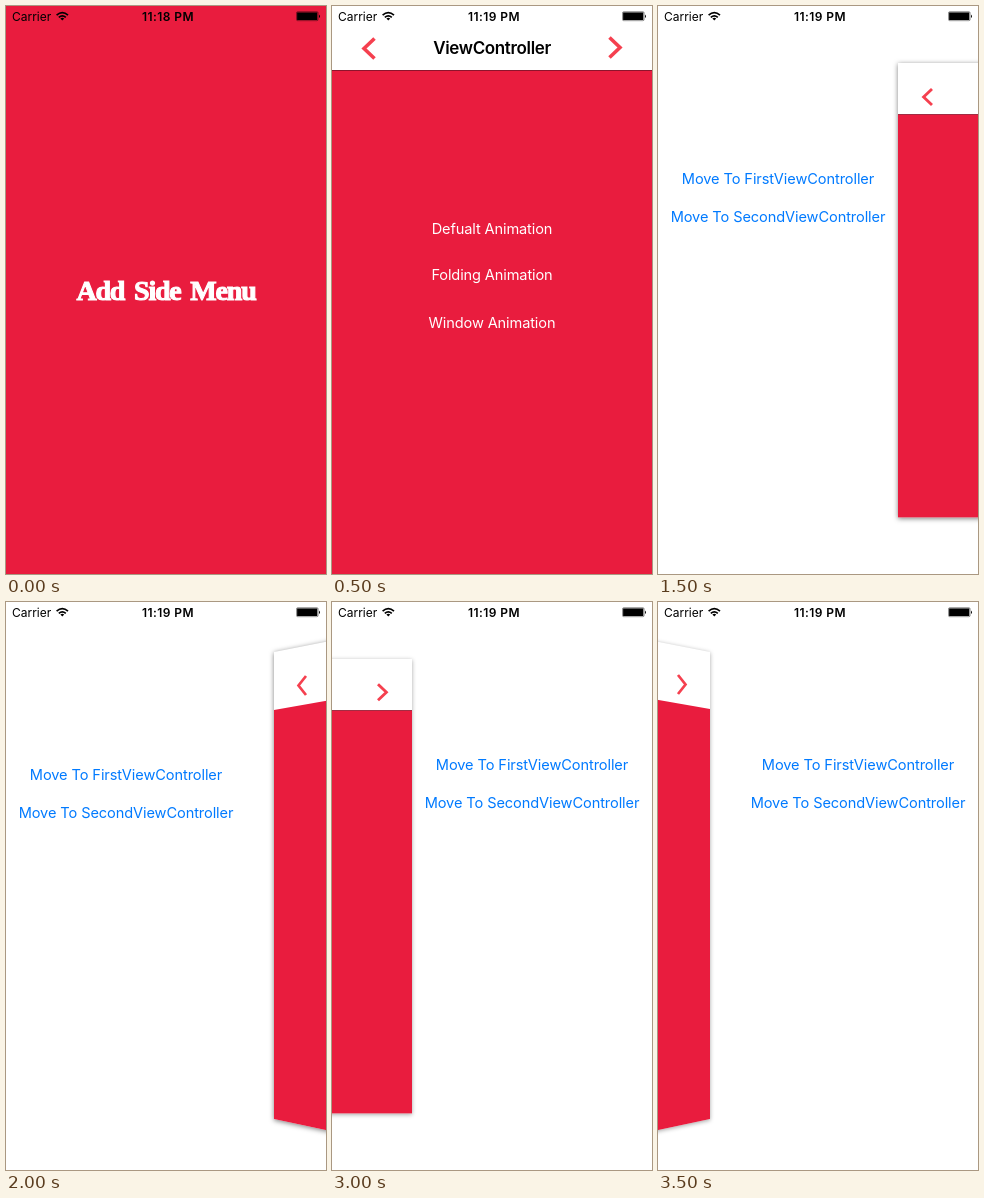
These frames come from a looping animation (320 px wide and 568 px high, 4000 ms). An HTML page:

```html
<!DOCTYPE html>
<html lang="en">
<head>
<meta charset="utf-8">
<style>
  html, body { margin: 0; width: 100%; height: 100%; overflow: hidden; background: #fff; }
  svg { display: block; width: 320px; height: 568px; font-family: Inter, Roboto, sans-serif; }
  .slab { font: bold 28px "Liberation Serif", serif; letter-spacing: -1.2px; word-spacing: 4px; fill: #fff; stroke: #fff; stroke-width: 1.1; }
  .title { font-size: 17px; font-weight: 600; letter-spacing: -.35px; }
  .item { font-size: 14.6px; letter-spacing: -.13px; fill: #fff; }
  .link { font-size: 14.6px; letter-spacing: -.1px; fill: #007aff; }
  .clock { font-size: 12px; font-weight: 600; letter-spacing: .4px; }
  .carrier { font-size: 12px; }
  .arrow { fill: none; stroke: #f5404f; stroke-width: 3.6; }
  .tilted .arrow { stroke-width: 2.7; }
  .left { filter: drop-shadow(0 1.5px 2.6px rgba(0, 0, 0, .5)); }
  .right { filter: drop-shadow(0 1.5px 2.3px rgba(0, 0, 0, .35)); }
</style>
</head>
<body>
<svg id="stage" viewBox="0 0 320 568"></svg>
<script>
const RED = '#e91c3e';
const stage = document.getElementById('stage');

const label = (kind, x, y, text, anchor = 'middle') =>
  `<text class="${kind}" x="${x}" y="${y}" text-anchor="${anchor}">${text}</text>`;
const rect = (x, y, w, h, fill) =>
  `<rect x="${x}" y="${y}" width="${w}" height="${h}" fill="${fill}"/>`;
const arrow = (x, y, w = 10.5, h = 10) =>
  `<path class="arrow" d="M${x + w} ${y - h}L${x} ${y}l${w} ${h}"/>`;
const mirror = content => `<g transform="matrix(-1 0 0 1 320 0)">${content}</g>`;

const statusBar = time =>
  label('carrier', 6, 14.5, 'Carrier', 'start') +
  label('clock', 162, 14.5, time) +
  `<g fill="none" stroke="#000" stroke-width="1.7">
    <path d="M50.6 9.2q5.7-5 11.4 0M52.8 11.4q3.5-3 7 0"/>
    <path d="M54.4 12.4q1.9-1.5 3.8 0l-1.9 2z" fill="#000" stroke="none"/>
  </g>
  <rect x="290.5" y="5.7" width="21.6" height="9" rx="1.2" stroke="#000" stroke-opacity=".6" stroke-width=".7" fill="none"/>
  ${rect(291.1, 6.4, 20.2, 7.6, '#000')}
  <path d="M313 8.4q2 1.8 0 3.6z"/>`;

const page = () => rect(0, 0, 320, 568, '#fff') + rect(0, 64, 320, 504, RED) + rect(0, 64, 320, .6, '#501020');

// Panel styles, drawn at the right edge; the left side is their mirror.
const panels = {
  slide: dy => `<g transform="translate(240 0)">${page()}${arrow(32, 42.5 + dy)}</g>`,
  shrink: dy => `<g transform="translate(240 57) scale(.8)">${page()}${arrow(32, 42.5 + dy)}</g>`,
  tilt: dy => `<g class="tilted"><path d="M268 50L400 24V545L268 517z" fill="#fff"/>
    <path d="M268 ${108 + dy}L400 ${85 + dy}V545L268 517z" fill="${RED}"/>${arrow(292.5, 83.5 + dy, 7.5, 9.5)}</g>`
};

const home = () => rect(0, 0, 320, 568, RED) + label('slab', 160, 294, 'Add Side Menu') + statusBar('11:18 PM');

const list = () => page() + arrow(32, 42.5) + mirror(arrow(32, 41.5)) +
  label('title', 160, 48, 'ViewController') +
  label('item', 160, 227.5, 'Defualt Animation') +
  label('item', 160, 273.5, 'Folding Animation') +
  label('item', 160, 321.5, 'Window Animation') +
  statusBar('11:19 PM');

const menu = (side, style, time) => {
  const isLeft = side === 'left';
  const panel = `<g class="${side}">${panels[style](isLeft ? 0 : -1)}</g>`;
  const x = isLeft ? 120 : 200, y = isLeft ? 178 : 168;
  return rect(0, 0, 320, 568, '#fff') +
    label('link', x, y, 'Move To FirstViewController') +
    label('link', x, y + 38, 'Move To SecondViewController') +
    (isLeft ? panel : mirror(panel)) + statusBar(time);
};

const scenes = [
  home(),
  list(),
  menu('left', 'slide', '11:19 PM'),
  menu('left', 'shrink', '11:19 PM'),
  menu('left', 'tilt', '11:19 PM'),
  menu('right', 'slide', '11:20 PM'),
  menu('right', 'shrink', '11:19 PM'),
  menu('right', 'tilt', '11:19 PM')
];

let current = -1;
function draw() {
  const index = Math.floor(performance.now() / 500) % scenes.length;
  if (index !== current) stage.innerHTML = scenes[current = index];
  requestAnimationFrame(draw);
}
draw();
</script>
</body>
</html>
```
